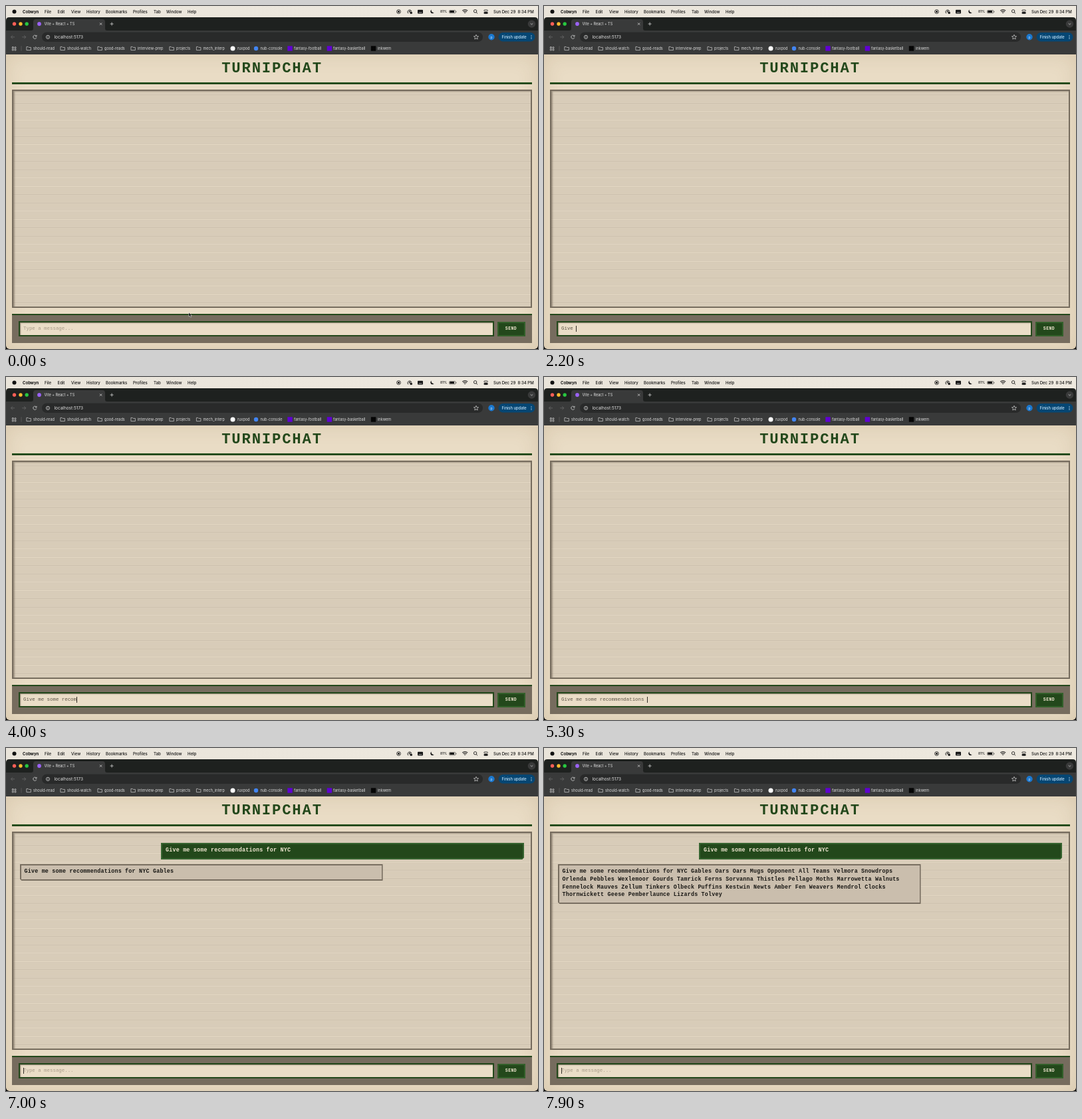
Write an HTML page that moves like this. It is 800 px wide and 517 px high and loops after 8000 ms.

```html
<!DOCTYPE html>
<html lang="en">
<head>
<meta charset="utf-8">
<title>Chat</title>
<style>
  :root { --green: #23481b; --cream: #e9dcc5; --taupe: #766c5e; }
  html, body { margin: 0; width: 100%; height: 100%; overflow: hidden; background: #000; }
  #stage { position: absolute; inset: 0; width: 800px; height: 517px; overflow: hidden; }
  #stage div, #stage svg { position: absolute; box-sizing: border-box; }
  svg { left: 0; top: 0; }
  svg text { font-family: Inter, sans-serif; white-space: pre; }
  #page {
    left: 0; top: 73px; width: 800px; height: 444px; border-radius: 0 0 5px 5px;
    background: var(--cream); box-shadow: inset 0 0 30px rgba(120, 85, 40, .15);
    font-family: "Liberation Mono", "Courier New", monospace;
  }
  #title {
    left: 0; width: 800px; top: 9px; line-height: 25px; text-align: center;
    font-size: 22.2px; font-weight: 700; letter-spacing: 1.85px; color: var(--green);
  }
  #rule { left: 9px; top: 42px; width: 782px; height: 3px; background: linear-gradient(#2f5b26 1px, var(--green) 1px); }
  #chat {
    left: 9px; top: 53px; width: 782px; height: 329px; border: 2px solid #756b5d;
    background: repeating-linear-gradient(#e0d4c0 0 .926px, #d0c4b1 .926px 1.852px);
    box-shadow: inset 2px 1px 2px rgba(70, 60, 45, .4);
  }
  .bubble {
    width: 546px; padding: 4.9px 5px; border: 2px solid; white-space: pre-wrap;
    font-size: 8.33px; line-height: 11.67px; font-weight: 700; letter-spacing: .23px;
  }
  #sent {
    left: 233px; top: 69.5px; background: var(--green); border-color: #366430; color: #f0e6d0;
    clip-path: polygon(0 0, 100% 0, 100% calc(100% - 3px), calc(100% - 3px) 100%, 0 100%);
  }
  #reply {
    left: 20.5px; top: 101.5px; background: #cabead; border-color: #776d5f; color: #181714;
    clip-path: polygon(0 0, 100% 0, 100% 100%, 3px 100%, 0 calc(100% - 3px));
  }
  #bar { left: 9px; top: 390.5px; width: 782px; height: 44px; background: var(--taupe); border-top: 2px solid var(--green); }
  #input {
    left: 18.5px; top: 402px; width: 715px; height: 23px; padding-left: 5.5px; border: 2px solid var(--green);
    background: #eaddc7; box-shadow: inset 1px 1px 1.5px rgba(70, 60, 45, .55);
    font-size: 7.41px; line-height: 19px; white-space: pre;
  }
  #caret { top: 409px; width: 1px; height: 9px; background: #302c25; }
  #send {
    left: 738.5px; top: 402.5px; width: 42px; height: 22px; border: 2px solid #33602a; background: var(--green);
    color: #f0e6d0; font-size: 6.48px; line-height: 18px; font-weight: 700; letter-spacing: .46px; text-align: center;
  }
</style>
</head>
<body>
<div id="stage">
  <div id="page">
    <div id="title">TURNIPCHAT</div>
    <div id="rule"></div>
    <div id="chat"></div>
    <div id="sent" class="bubble"></div>
    <div id="reply" class="bubble"></div>
    <div id="bar"></div>
    <div id="input"></div>
    <div id="caret"></div>
    <div id="send">SEND</div>
  </div>

  <svg width="800" height="517" viewBox="0 0 800 517">
    <defs>
      <linearGradient id="menu"><stop stop-color="#e9e4da"/><stop offset="1" stop-color="#eee9df"/></linearGradient>
      <path id="folder" d="M.4 -2.3h2.3l1 1h3.2v4.2h-6.5z" fill="none" stroke="#c6c6c6" stroke-width=".75" stroke-linejoin="round"/>
    </defs>
    <rect width="800" height="24" fill="url(#menu)"/>
    <path d="M0 73V22q0-5 5-5h790q5 0 5 5v51z" fill="#1e211f"/>
    <path d="M0 37h38q3 0 3-3V24q0-4 4-4h100q4 0 4 4v10q0 3 3 3h648v36H0z" fill="#393a3a"/>
    <rect x="54" y="39.5" width="663" height="14.5" rx="7.2" fill="#292a2a"/>

    <!-- menu bar -->
    <circle cx="12.5" cy="8.5" r="3" fill="#111"/>
    <g fill="none" stroke="#151515" stroke-width=".9">
      <circle cx="590.5" cy="8.5" r="2.9"/>
      <path d="M605 11.2a3 3 0 1 1 4.8-3.2"/><circle cx="607" cy="8.2" r="1"/>
      <rect x="666.6" y="6.4" width="9.4" height="4.4" rx="1.2" stroke-width=".5"/>
      <path d="M686.2 7.2q4-3.4 8 0M687.7 8.8q2.5-2 5 0M689.2 10.3q1-.7 2 0" stroke-width="1.1"/>
      <circle cx="705.6" cy="7.8" r="2.2"/><path d="M707.2 9.5l1.9 1.9"/>
      <rect x="718.8" y="5.8" width="5.6" height="2.2" rx="1.1" stroke-width=".7"/>
    </g>
    <g fill="#151515">
      <circle cx="590.5" cy="8.5" r="1.5"/>
      <rect x="607.6" y="8.8" width="3.2" height="3" rx=".6"/>
      <rect x="619" y="5.8" width="8" height="5.6" rx=".8"/>
      <path d="M639.8 5.5a3 3 0 1 0 4 4.2a3.2 3.2 0 0 1-4-4.2z"/>
      <rect x="667.3" y="7.1" width="6.8" height="3" rx=".6"/><rect x="676.5" y="7.8" width=".7" height="1.6"/>
      <rect x="718.5" y="9" width="6.2" height="2.8" rx="1.4"/>
    </g>
    <path d="M620.5 9.8h5" stroke="#ddd" stroke-width=".7"/>

    <!-- tab strip -->
    <circle cx="12.5" cy="27" r="2.7" fill="#fe5f57"/>
    <circle cx="22" cy="27" r="2.7" fill="#febc2e"/>
    <circle cx="31.2" cy="27" r="2.7" fill="#28c840"/>
    <circle cx="50" cy="27" r="2.9" fill="#9b62f5"/>
    <circle cx="790.5" cy="27" r="5.8" fill="#393a3a"/>
    <g fill="none" stroke="#d6d6d6" stroke-width=".8">
      <path d="M141 25.4l3.2 3.2m0-3.2l-3.2 3.2M156.6 27h5m-2.5-2.5v5M788.7 26.2l1.8 1.7 1.8-1.7"/>
      <path d="M45.6 45.3a2.6 2.6 0 1 0 .3 2.2M46 43.8v2h-2"/>
      <circle cx="63" cy="46.8" r="2.6"/><path d="M63 46.4v1.8m0-3.2v.7"/>
      <path d="M707 43.2l1 2.4 2.6.2-2 1.7.6 2.5-2.2-1.3-2.2 1.3.6-2.5-2-1.7 2.6-.2z" stroke-width=".7"/>
      <path d="M13 46.8H7.6m2.4-2.5l-2.5 2.5 2.5 2.5M24.3 46.8h5.4m-2.4-2.5l2.5 2.5-2.5 2.5" stroke="#6b6b6b"/>
    </g>
    <circle cx="730" cy="46.8" r="4.7" fill="#1b78cf"/>
    <rect x="740.5" y="40" width="55" height="13.6" rx="6.8" fill="#064673"/>
    <g fill="#c6e6fc"><circle cx="790" cy="44.6" r=".65"/><circle cx="790" cy="46.8" r=".65"/><circle cx="790" cy="49" r=".65"/></g>

    <!-- bookmarks -->
    <path d="M9.6 61.6h1.5m.7 0h0M9.3 61.8h2v2h-2zM13 61.8h2v2h-2zM9.3 65h2v2h-2zM13 65h2v2h-2z" fill="none" stroke="#c6c6c6" stroke-width=".7"/>
    <path d="M23 60.3v7.4" stroke="#666" stroke-width=".7"/>
    <circle cx="341" cy="64" r="3.5" fill="#fff"/>
    <circle cx="376" cy="64" r="3.2" fill="#4285f4"/>
    <rect x="423.3" y="60.3" width="7.4" height="7.4" fill="#6001d2"/>
    <rect x="482.7" y="60.3" width="7.4" height="7.4" fill="#6001d2"/>
    <rect x="548.8" y="60.3" width="7.4" height="7.4" fill="#050505"/>
    <g id="labels"></g>

    <!-- bottom window corners -->
    <path d="M0 512v5h5q-5 0-5-5zM800 512v5h-5q5 0 5-5z" fill="#000"/>

    <!-- pointer -->
    <path id="arrow" d="M0 0v6.2l1.4-1.3 1.1 2.5 1.1-.5-1.1-2.4h1.9z" fill="#000" stroke="#fff" stroke-width=".5"/>
    <path id="beam" d="M-1.5-4.2q1.5 0 1.5 1q0-1 1.5-1M0-3.2v6.4M-1.5 4.2q1.5 0 1.5-1q0 1 1.5 1" fill="none" stroke="#222" stroke-width=".8"/>
  </svg>
</div>

<script>
const $ = id => document.getElementById(id);
const SVG = "http://www.w3.org/2000/svg";

function label(x, y, size, fill, str, weight = 400) {
  const el = document.createElementNS(SVG, "text");
  const attrs = { x, y, fill, "font-size": size, "font-weight": weight };
  for (const k in attrs) el.setAttribute(k, attrs[k]);
  el.textContent = str;
  $("labels").append(el);
}

label(25, 10.7, 6.02, "#111", "Cobwyn", 700);
[[58, "File"], [77.5, "Edit"], [98, "View"], [121, "History"], [150, "Bookmarks"], [191, "Profiles"],
 [222, "Tab"], [241, "Window"], [273, "Help"], [733, "Sun Dec 29  8:34 PM"]]
  .forEach(([x, s]) => label(x, 10.7, 6.02, "#111", s, 500));
label(653, 10.4, 5, "#111", "81%", 500);
label(57.5, 29, 5.56, "#e4e4e4", "Vite + React + TS");
label(72.5, 49.2, 6.48, "#e4e4e4", "localhost:5173");
label(728.6, 48.5, 5, "#cfe6fa", "p");
label(745.5, 48.9, 5.8, "#c6e6fc", "Finish update", 500);
[[41, "should-read"], [92, "should-watch"], [148, "good-reads"], [198, "interview-prep"], [256, "projects"],
 [296.5, "mech_interp"], [348, "ruxpod"], [382.5, "nub-console"], [433, "fantasy-football"],
 [492, "fantasy-basketball"], [559, "inkwem"]].forEach(([x, s], i) => {
  label(x, 65.9, 5.56, "#dedede", s);
  if (i > 5) return;
  const icon = document.createElementNS(SVG, "use");
  icon.setAttribute("href", "#folder");
  icon.setAttribute("transform", `translate(${x - 10.5} 63.7)`);
  $("labels").append(icon);
});

const LOOP = 8000, STEP = 100;
const PROMPT = "Give me some recommendations for NYC";
const HINT = "Type a message...";
const WORDS = (PROMPT + " Gables Oars Oars Mugs Opponent All Teams Velmora Snowdrops Orlenda Pebbles " +
  "Wexlemoor Gourds Tamrick Ferns Sorvanna Thistles Pellago Moths Marrowetta Walnuts Fennelock Mauves " +
  "Zellum Tinkers Olbeck Puffins Kestwin Newts Amber Fen Weavers Mendrol Clocks Thornwickett Geese " +
  "Pemberlaunce Lizards Tolvey").split(" ");

// Step at which each character of the prompt is typed
const KEYS = [16, 18, 20, 21, 22, 24, 25, 26, 28, 30, 32, 34, 36, 38, 39, 39, 40, 40, 41,
  43, 44, 45, 46, 47, 49, 50, 51, 52, 53, 54, 55, 57, 58, 61, 64, 67];
const CLICK = 10, SEND = 69, CHAR = 4.446;

function movePointer(step) {
  const p = Math.min(step / 7, 1), e = p * p * (3 - 2 * p);
  const x = 275 - 12 * e, y = 462 + 27 * e;
  const overInput = y > 476, shown = step < KEYS[0];
  $("arrow").style.display = shown && !overInput ? "" : "none";
  $("beam").style.display = shown && overInput ? "" : "none";
  for (const id of ["arrow", "beam"]) $(id).setAttribute("transform", `translate(${x} ${y})`);
}

function draw(step) {
  const sent = step >= SEND;
  const typed = KEYS.filter(k => k <= step);
  const count = sent ? 0 : typed.length;

  $("input").textContent = count ? PROMPT.slice(0, count) : HINT;
  $("input").style.color = count ? "#5d5648" : "#a89c89";

  const last = typed.length ? typed[typed.length - 1] : CLICK;
  const lit = step >= CLICK && (step - last) % 10 < 5;
  $("caret").style.display = lit ? "" : "none";
  $("caret").style.left = 25.6 + count * CHAR + "px";

  $("sent").style.display = $("reply").style.display = sent ? "" : "none";
  $("sent").textContent = PROMPT;
  $("reply").textContent = WORDS.slice(0, Math.round(3 + (step - SEND) * 4.2)).join(" ");

  movePointer(step);
}

let shownStep = -1;
function tick() {
  const step = Math.floor(performance.now() % LOOP / STEP);
  if (step !== shownStep) draw(shownStep = step);
  requestAnimationFrame(tick);
}
tick();
</script>
</body>
</html>
```
